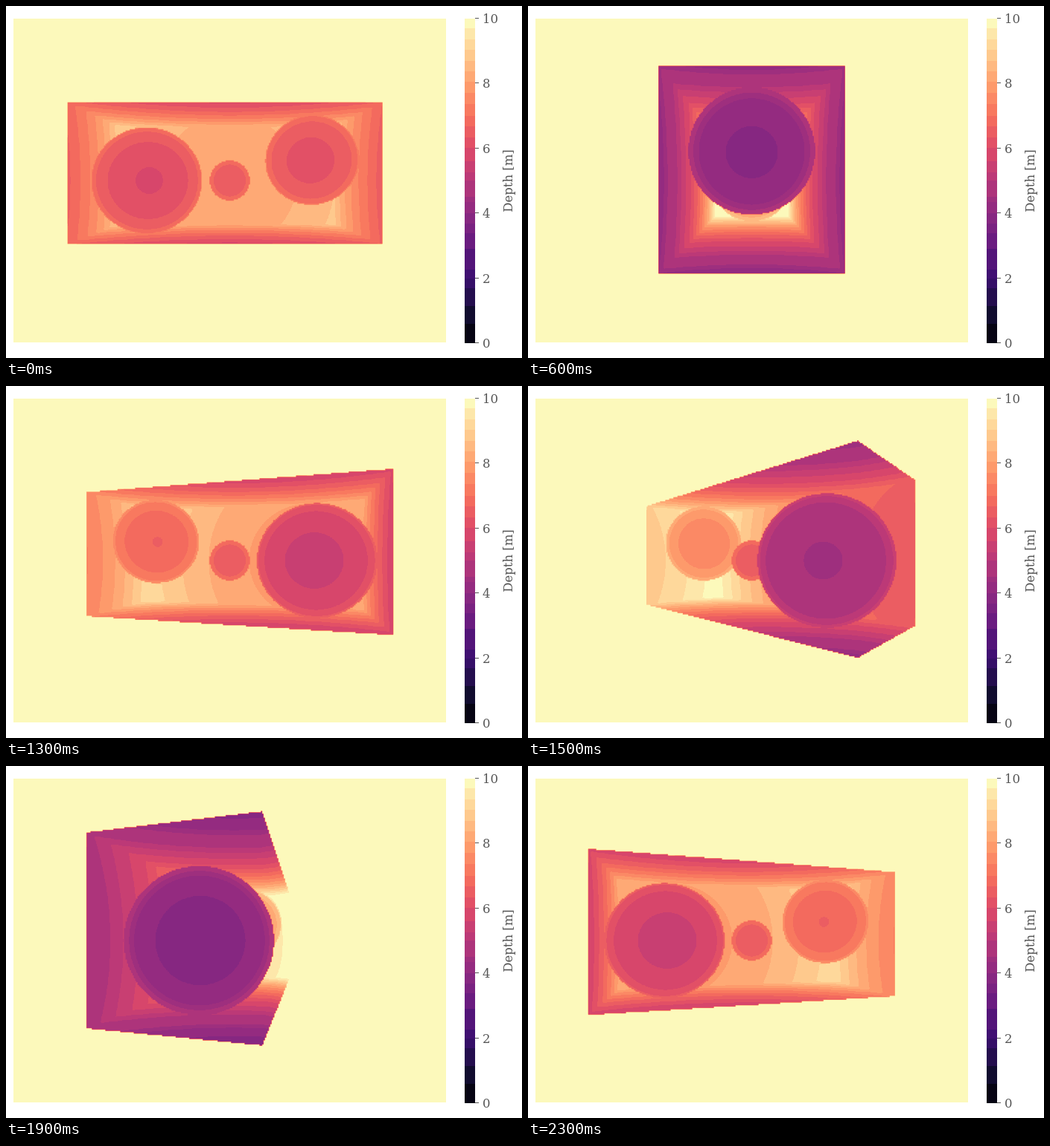
Recreate the animation shown at these times as an HTML page with a canvas. Size 693x474 px, loop 2400 ms.

```html
<!DOCTYPE html>
<html lang="en">
<head>
<meta charset="utf-8">
<title>Depth orbit</title>
<style>
html, body { margin: 0; width: 100%; height: 100%; overflow: hidden; background: #fff; }
canvas { position: absolute; left: 10px; top: 17px; }
svg { position: absolute; left: 0; top: 0; }
text { font: 16.5px "DejaVu Serif", "Noto Serif", serif; fill: #555; }
</style>
</head>
<body>
<canvas width="581" height="436"></canvas>
<svg width="693" height="474"></svg>
<script>
const W = 581, H = 436, GW = 320, GH = 240;
const BAR_TOP = 17, BAR_BOTTOM = 454, BAR_H = BAR_BOTTOM - BAR_TOP;
const MAGMA = ['000004', '140e36', '3b0f70', '641a80', '8c2981', 'b73779',
  'de4968', 'f7705c', 'fe9f6d', 'fecf92', 'fcfdbf']
  .map(h => [0, 2, 4].map(i => parseInt(h.slice(i, i + 2), 16)));
// Edges of the colour bands along the bar, from 10 m down to 0 m.
const EDGES = [17, 30, 45, 59, 74, 88, 102, 117, 132, 148, 162, 177, 191, 209, 224,
  235, 257, 264, 279, 293, 306, 327, 355, 367, 380, 404, 428, 454];

function magma(v) {
  const i = Math.min(9, Math.floor(v * 10)), f = v * 10 - i;
  return MAGMA[i].map((c, k) => Math.round(c + (MAGMA[i + 1][k] - c) * f));
}

const bands = EDGES.slice(1).map((end, i) => {
  const start = EDGES[i];
  const v = i ? (BAR_BOTTOM - (start + end) / 2) / BAR_H : 0.992;
  return { start, end, rgb: magma(v) };
});

// Colour bar, ticks and labels
let svg = '';
for (const b of bands)
  svg += `<rect x="616" y="${b.start}" width="14" height="${b.end - b.start}" fill="rgb(${b.rgb})" shape-rendering="crispEdges"/>`;
for (let v = 0; v <= 10; v += 2) {
  const y = Math.round(BAR_BOTTOM - v / 10 * BAR_H);
  svg += `<path d="M630 ${y - 0.5}h5" stroke="#555"/><text x="640" y="${y + 6}">${v}</text>`;
}
svg += '<text transform="translate(680 235.5) rotate(-90)" text-anchor="middle">Depth [m]</text>';
document.querySelector('svg').innerHTML = svg;

// Colour lookup by depth in hundredths of a metre
const lut = new Uint32Array(1001);
for (let i = 0; i <= 1000; i++) {
  const y = BAR_BOTTOM - i / 1000 * BAR_H;
  const [r, g, b] = (bands.find(band => y < band.end) || bands[bands.length - 1]).rgb;
  lut[i] = (255 << 24 | b << 16 | g << 8 | r) >>> 0;
}

const DIST = 7, MAX_DEPTH = 10, FOCAL = GH / 2 * Math.sqrt(3);
const LAG = 0.06; // far walls read slightly short, in proportion to the path in the box
const SPHERES = [[-2, 0, 0, 1.3], [0, 0, 0, 0.5], [2, 0.5, 0, 1.1]];
const LOW = [-3.3, -1.3, -1.3], HIGH = [3.1, 1.6, 1.3];

function castRay(o, d) {
  let near = 0, far = 1e9;
  for (let k = 0; k < 3; k++) {
    const a = (LOW[k] - o[k]) / d[k], b = (HIGH[k] - o[k]) / d[k];
    near = Math.max(near, Math.min(a, b));
    far = Math.min(far, Math.max(a, b));
  }
  if (near >= far) return MAX_DEPTH;
  let t = far - LAG * (far - near);
  for (const [x, y, z, r] of SPHERES) {
    const cx = x - o[0], cy = y - o[1], cz = z - o[2];
    const along = cx * d[0] + cy * d[1] + cz * d[2];
    const disc = r * r - (cx * cx + cy * cy + cz * cz - along * along);
    if (disc > 0) t = Math.min(t, along - Math.sqrt(disc));
  }
  return Math.min(t, MAX_DEPTH);
}

// Smooth resampling positions from the depth grid to the picture
function taps(size, cells) {
  return Array.from({ length: size }, (_, p) => {
    const s = Math.max(0, Math.min(cells - 1.001, (p + 0.5) * cells / size - 0.5));
    const i = Math.floor(s);
    return { i, w: (1 - Math.cos(Math.PI * (s - i))) / 2 };
  });
}

const cols = taps(W, GW), rows = taps(H, GH);
const grid = new Float32Array(GW * GH);
const ctx = document.querySelector('canvas').getContext('2d');
const image = ctx.createImageData(W, H);
const pixels = new Uint32Array(image.data.buffer);

function render(angle) {
  const s = Math.sin(angle), c = Math.cos(angle);
  const eye = [DIST * s, 0, DIST * c];
  for (let j = 0; j < GH; j++) {
    const v = (GH / 2 - j - 0.5) / FOCAL;
    for (let i = 0; i < GW; i++) {
      const u = (i + 0.5 - GW / 2) / FOCAL, n = Math.hypot(1, u, v);
      grid[j * GW + i] = castRay(eye, [(u * c - s) / n, v / n, (-u * s - c) / n]);
    }
  }
  let p = 0;
  for (const row of rows)
    for (const col of cols) {
      const k = row.i * GW + col.i;
      const top = grid[k] + (grid[k + 1] - grid[k]) * col.w;
      const low = grid[k + GW] + (grid[k + GW + 1] - grid[k + GW]) * col.w;
      pixels[p++] = lut[Math.round((top + (low - top) * row.w) * 100)];
    }
  ctx.putImageData(image, 0, 0);
}

const STEPS = 24, STEP_MS = 100;
let shown = -1, start;
function tick(now) {
  start ??= now;
  const step = Math.floor((now - start) / STEP_MS) % STEPS;
  if (step !== shown) render(2 * Math.PI * (shown = step) / STEPS);
  requestAnimationFrame(tick);
}
requestAnimationFrame(tick);
</script>
</body>
</html>
```
